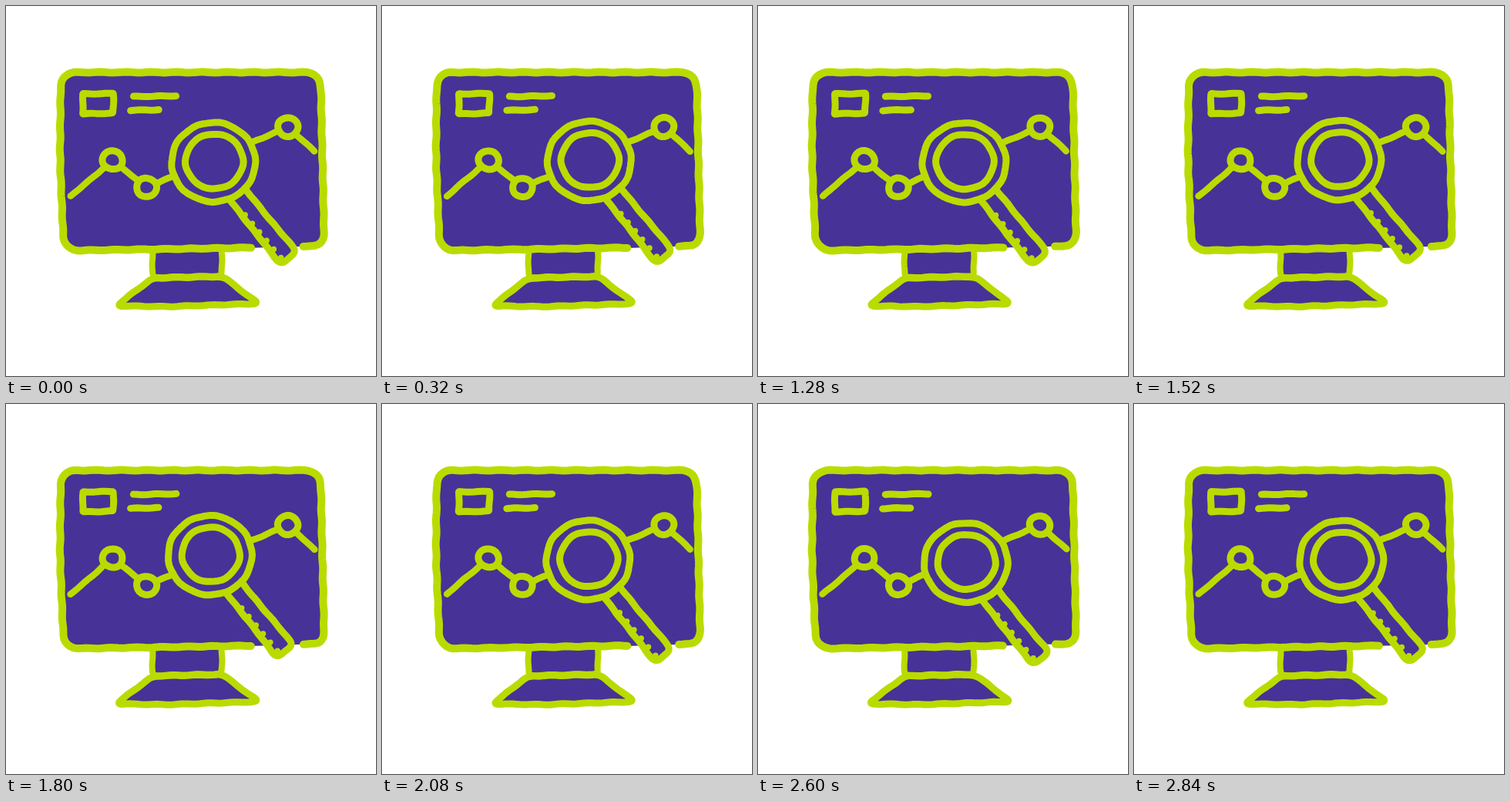
An HTML page with a canvas that plays this animation: 480x480 px, repeating every 2.88 s.

```html
<!DOCTYPE html>
<html lang="en">
<head>
<meta charset="utf-8">
<title>Chart under a magnifier</title>
<style>
  html, body { margin: 0; width: 100%; height: 100%; overflow: hidden; background: #fff; }
  canvas { display: block; width: 100vmin; height: 100vmin; }
</style>
</head>
<body>
<canvas id="stage" width="480" height="480"></canvas>
<script>
const ctx = document.getElementById('stage').getContext('2d');
const GREEN = '#badb00', PURPLE = '#473297';
const LOOP = 2880, STEP = 40, TURN = 2 * Math.PI;

// Resting poses of the magnifier, eased from one to the next
const poses = [
  { at: 0, x: -.3, y: -.5 }, { at: 320, x: -.6, y: -2 }, { at: 800, x: 1, y: -5 },
  { at: 1280, x: -2, y: 0 }, { at: 1800, x: -4.8, y: -6.8 }, { at: 2360, x: .5, y: 5.3 },
  { at: LOOP, x: -.3, y: -.5 },
];

let phase = 0;

const mix = (a, b, u) => a + (b - a) * u;
const between = (p, q, u) => [mix(p[0], q[0], u), mix(p[1], q[1], u)];

// Uneven hand-drawn line that trembles a little over the loop
function tremble([x, y]) {
  return [x + .45 * Math.sin(y * .21 + x * .05 + Math.sin(3 * phase)),
          y + .45 * Math.sin(x * .19 - y * .07 + Math.sin(2 * phase))];
}

// Dense points along a polygon or line whose corners are rounded by radius
function rounded(corners, radius, closed) {
  const n = corners.length, points = [];
  corners.forEach((corner, i) => {
    if (!closed && (i === 0 || i === n - 1)) return points.push(corner);
    const toward = other => {
      const length = Math.hypot(other[0] - corner[0], other[1] - corner[1]);
      return between(corner, other, Math.min(.5, radius / length));
    };
    const from = toward(corners[(i + n - 1) % n]), to = toward(corners[(i + 1) % n]);
    for (let u = 0; u <= 1; u += .125)
      points.push(between(between(from, corner, u), between(corner, to, u), u));
  });
  return points;
}

function subdivide(points, closed) {
  return points.flatMap((p, i) => {
    const last = i === points.length - 1;
    if (last && !closed) return [p];
    const q = points[(i + 1) % points.length];
    const parts = Math.ceil(Math.hypot(q[0] - p[0], q[1] - p[1]) / 5) || 1;
    return Array.from({ length: parts }, (_, k) => between(p, q, k / parts));
  });
}

function ink(corners, { width = 9, radius = 5, closed = false, fill = false } = {}) {
  ctx.beginPath();
  for (const p of subdivide(rounded(corners, radius, closed), closed))
    ctx.lineTo(...tremble(p));
  if (closed) ctx.closePath();
  if (fill) ctx.fill();
  ctx.lineWidth = width;
  ctx.stroke();
}

function ring(x, y, rx, ry) {
  const points = Array.from({ length: 48 }, (_, i) =>
    [x + rx * Math.cos(i / 48 * TURN), y + ry * Math.sin(i / 48 * TURN)]);
  ink(points, { radius: 0, closed: true, fill: true });
}

function drawMonitor() {
  ink([[190, 316], [190, 352], [280, 350], [280, 316]], { width: 8, fill: true });
  ink([[190, 353], [281, 351], [328, 386], [210, 390], [143, 389]],
      { radius: 8, closed: true, fill: true });
  ink([[318, 313.5], [75, 317.5], [70, 200], [71, 86], [408, 86], [413, 311], [385.5, 311.5]],
      { width: 10, radius: 22, fill: true });
  ink([[100, 114], [139.5, 113.5], [139, 139], [99.5, 140]], { radius: 1, closed: true });
  ink([[165, 117.5], [221, 116.5]]);
  ink([[162, 135.5], [198, 134.5]]);
}

function drawChart() {
  const nodes = [[138.3, 199.8], [182.3, 235.5], [365.5, 157]];
  ink([[84, 247], ...nodes, [400, 188.5]], { radius: 0, width: 8.5 });
  for (const [x, y] of nodes) ring(x, y, 13, 12.2);
}

function drawMagnifier() {
  ink([[291, 252], [356, 336], [378, 320], [312, 240]], { radius: 9, fill: true });
  ctx.fillStyle = GREEN;
  for (let i = 0; i < 6; i++) {
    ctx.beginPath();
    ctx.arc(310.5 + 9.3 * i, 271.5 + 11.1 * i, 3.7, 0, TURN);
    ctx.fill();
  }
  ctx.fillStyle = PURPLE;
  ring(269.5, 203, 54.3, 51.5);
  ring(270.5, 202, 37.5, 35.5);
}

function poseAt(t) {
  const i = poses.findIndex(pose => pose.at > t);
  const a = poses[i - 1], b = poses[i];
  const u = (t - a.at) / (b.at - a.at), eased = u * u * (3 - 2 * u);
  return [mix(a.x, b.x, eased), mix(a.y, b.y, eased)];
}

function draw(elapsed) {
  const t = Math.floor(elapsed % LOOP / STEP) * STEP;
  phase = TURN * t / LOOP;
  ctx.fillStyle = '#fff';
  ctx.fillRect(0, 0, 480, 480);
  ctx.fillStyle = PURPLE;
  ctx.strokeStyle = GREEN;
  ctx.lineCap = ctx.lineJoin = 'round';
  drawMonitor();
  drawChart();
  ctx.save();
  ctx.translate(...poseAt(t));
  drawMagnifier();
  ctx.restore();
}

let start;
function frame(now) {
  start ??= now;
  draw(now - start);
  requestAnimationFrame(frame);
}
draw(0);
requestAnimationFrame(frame);
</script>
</body>
</html>
```
